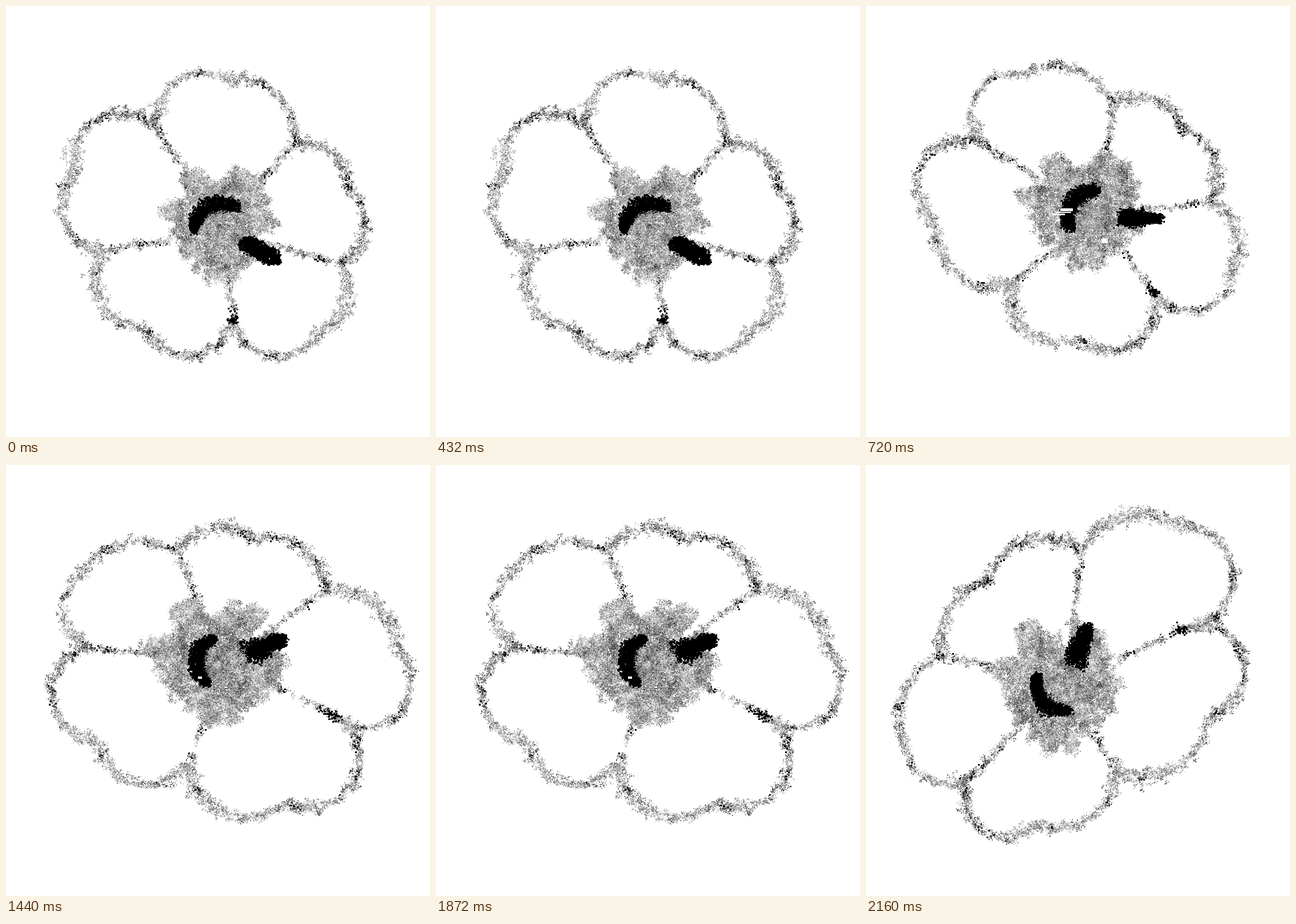
An HTML page with a canvas for the animation above (2.88 s loop, 742 by 754 pixels).

```html
<!DOCTYPE html>
<html lang="en">
<head>
<meta charset="utf-8">
<title>Turning flower</title>
<style>
html, body { margin: 0; width: 100%; height: 100%; overflow: hidden; background: #fff; }
canvas { display: block; }
</style>
</head>
<body>
<canvas id="stage" width="742" height="754"></canvas>
<script>
const W = 742, H = 754, HOLD = 720, TAU = Math.PI * 2;
const ctx = document.getElementById("stage").getContext("2d");

// A petal rim is two arcs: joint x, y, notch x, y, then how far each arc bulges per chord.
// core: center and radii of the stamens; gap: direction of the dark cleft in degrees.
const poses = [
  {
    petals: [
      [396, 548, 550, 566, 0.35, 0.28], [582, 452, 598, 318, 0.27, 0.24],
      [503, 240, 390, 128, 0.25, 0.32], [262, 212, 118, 295, 0.38, 0.32],
      [170, 428, 243, 562, 0.32, 0.36]
    ],
    core: [378, 380, 118, 108], heart: [378, 391], gap: 29, glints: [[411, 430, 4, 4]]
  },
  {
    petals: [
      [502, 500, 640, 458, 0.37, 0.25], [600, 342, 552, 216, 0.26, 0.26],
      [432, 172, 275, 119, 0.23, 0.4], [208, 242, 122, 382, 0.46, 0.29],
      [255, 482, 370, 580, 0.34, 0.38]
    ],
    core: [386, 355, 132, 110], heart: [403, 367], gap: 2,
    glints: [[340, 354, 22, 5], [333, 360, 26, 2], [326, 363, 22, 3], [412, 407, 11, 8]]
  },
  {
    petals: [
      [572, 438, 683, 318, 0.49, 0.24], [557, 220, 430, 130, 0.25, 0.23],
      [297, 150, 130, 190, 0.2, 0.31], [148, 318, 157, 480, 0.45, 0.34],
      [318, 522, 490, 588, 0.32, 0.5]
    ],
    core: [375, 342, 146, 118], heart: [383, 344], gap: -22, glints: [[336, 370, 7, 4]]
  },
  {
    petals: [
      [553, 287, 545, 103, 0.5, 0.22], [377, 150, 213, 203, 0.27, 0.22],
      [135, 332, 65, 480, 0.22, 0.29], [180, 545, 300, 627, 0.43, 0.27],
      [435, 535, 602, 435, 0.26, 0.54]
    ],
    core: [340, 383, 132, 126], heart: [348, 382], gap: -69, glints: [[319, 350, 5, 3]]
  }
];

function hash(x, y) {
  let h = Math.imul(x, 374761393) + Math.imul(y, 668265263);
  h = Math.imul(h ^ h >>> 13, 1274126177);
  return ((h ^ h >>> 16) >>> 0) / 4294967296;
}

function noise(x, y) {
  const i = Math.floor(x), j = Math.floor(y);
  const ease = v => v * v * (3 - 2 * v), mix = (a, b, v) => a + (b - a) * v;
  const u = ease(x - i), v = ease(y - j);
  return mix(mix(hash(i, j), hash(i + 1, j), u), mix(hash(i, j + 1), hash(i + 1, j + 1), u), v);
}

function render(pose) {
  const gray = new Float32Array(W * H).fill(255);
  let count = 0;
  const rand = () => hash(++count, 77);
  const bell = () => (rand() + rand() + rand() + rand() - 2) * 1.73;

  function block(x, y, w, h, tone, opacity = 1) {
    x = Math.round(x);
    y = Math.round(y);
    for (let j = y; j < y + h; j++)
      for (let i = x; i < x + w; i++)
        if (i >= 0 && i < W && j >= 0 && j < H)
          gray[j * W + i] += (tone - gray[j * W + i]) * opacity;
  }

  function tuft(x, y, tone) {
    for (let i = 0; i < 12; i++) {
      const size = rand() < 0.5 ? 1 : 2;
      block(x + bell() * 2.3, y + bell() * 2.3, size, size, tone + bell() * 45, 0.7);
    }
  }
  const ink = (x, y) => block(x + bell(), y + bell(), 3, 3, 0);

  // Fluffy line along at(u), u from 0 to 1; row picks its own strip of noise.
  function fuzz(at, length, width, row) {
    for (let s = 0; s < length; s++) {
      const u = s / length;
      const [x, y] = at(u);
      const [x2, y2] = at(u + 0.01);
      const step = Math.hypot(x2 - x, y2 - y) || 1;
      const nx = (y - y2) / step, ny = (x2 - x) / step;
      const swell = noise(u * 6, row), shade = noise(u * 14, row + 50);
      const w = width * (0.6 + 0.8 * swell);
      for (let n = w / 19 + rand(); n >= 1; n--) {
        const off = bell() * w * 0.36 + (shade - 0.5) * 5;
        tuft(x + nx * off, y + ny * off, 215 - 170 * shade * rand() - 60 * rand());
      }
      if (shade > 0.8 && rand() < 0.4) ink(x + bell() * 3, y + bell() * 3);
    }
  }

  function arc(ax, ay, bx, by, bulge, row) {
    const dx = bx - ax, dy = by - ay, half = 2 * Math.atan(2 * bulge);
    const radius = 0.5 / Math.sin(half);
    const at = u => {
      const angle = half * (2 * u - 1);
      const along = 0.5 + radius * Math.sin(angle);
      const out = radius * (Math.cos(angle) - Math.cos(half));
      return [ax + dx * along - dy * out, ay + dy * along + dx * out];
    };
    fuzz(at, Math.hypot(dx, dy) * radius * half * 2, 15, row);
  }

  const [cx, cy, rx, ry] = pose.core, [hx, hy] = pose.heart;
  const gap = pose.gap / 360 * TAU;

  pose.petals.forEach(([jx, jy, nx, ny, first, second], i) => {
    const [endX, endY] = pose.petals[(i + 1) % 5];
    arc(jx, jy, nx, ny, first, 2 * i);
    arc(nx, ny, endX, endY, second, 2 * i + 1);
    const reach = 0.55;
    const spoke = u => [jx + (hx - jx) * u * reach, jy + (hy - jy) * u * reach];
    fuzz(spoke, Math.hypot(hx - jx, hy - jy) * reach, 9, 20 + i);
  });
  const [clumpX, clumpY] = pose.petals[0];
  for (let i = 0; i < 40; i++) ink(clumpX + bell() * 5, clumpY + bell() * 4);

  // Stamens: ragged at the edge, split by a narrow white cut beside the cleft.
  for (let i = 0; i < rx * ry * 0.36; i++) {
    const angle = rand() * TAU, r = Math.sqrt(rand());
    const ragged = 0.7 + 0.4 * noise(20 + 5 * Math.cos(angle), 20 + 5 * Math.sin(angle));
    if (r > ragged - 0.15 * rand()) continue;
    const x = cx + rx * r * Math.cos(angle), y = cy + ry * r * Math.sin(angle);
    const turn = Math.atan2(y - hy, x - hx) - gap + 0.35;
    if (Math.abs(turn) < 0.1 && Math.hypot(x - hx, y - hy) > 65) continue;
    const shade = noise(x / 8, y / 8) + noise(x / 19, y / 19);
    tuft(x, y, 30 + 75 * shade + 45 * r + 40 * rand());
  }

  // Dark hollow: a crescent around the heart and a tapering cleft.
  function hollow(x, y, size) {
    const spread = size * (0.5 + noise(x / 7, y / 7));
    for (let i = 0; i < 16; i++) ink(x + (rand() - 0.5) * spread, y + (rand() - 0.5) * spread);
  }
  for (let u = 0; u < 1; u += 0.01) {
    const angle = gap + TAU * (0.42 + 0.33 * u);
    hollow(hx + 51 * Math.cos(angle), hy + 46 * Math.sin(angle), 12 + 16 * Math.sin(u * Math.PI));
    const far = 42 + 66 * u;
    hollow(hx + far * Math.cos(gap), hy + far * Math.sin(gap), 34 - 18 * u);
  }

  for (let i = 0; i < 420; i++) {
    const angle = rand() * TAU, r = Math.sqrt(rand());
    const x = hx + 35 * r * Math.cos(angle), y = hy + 31 * r * Math.sin(angle);
    tuft(x, y, 75 + 110 * noise(x / 6, y / 6) + 50 * rand());
  }
  for (const [x, y, w, h] of pose.glints) block(x, y, w, h, 255);

  const image = new ImageData(W, H);
  gray.forEach((g, i) => image.data.set([g, g, g, 255], i * 4));
  return image;
}

const images = poses.map(render);
let shown = -1;

function draw() {
  const index = Math.floor(performance.now() / HOLD) % images.length;
  if (index !== shown) ctx.putImageData(images[shown = index], 0, 0);
  requestAnimationFrame(draw);
}
draw();
</script>
</body>
</html>
```
